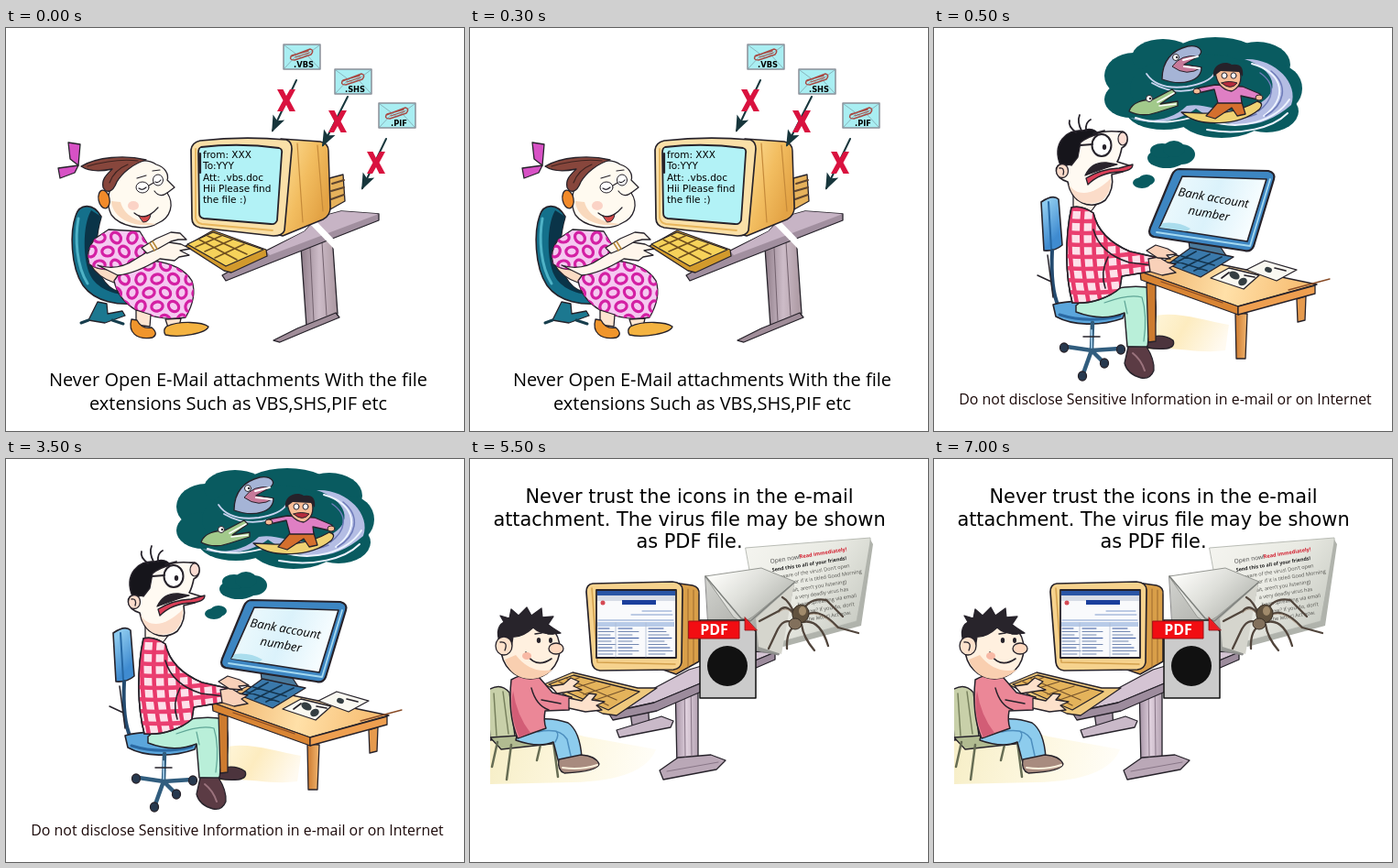
These frames come from a looping animation (500 px wide and 440 px high, 8 s). An HTML page with a canvas:

```html
<!DOCTYPE html>
<html lang="en">
<head>
<meta charset="utf-8">
<title>E-mail safety tips</title>
<style>
html, body { margin: 0; width: 100%; height: 100%; overflow: hidden; background: #fff; }
canvas { display: block; width: 500px; height: 440px; }
</style>
</head>
<body>
<canvas id="stage" width="500" height="440"></canvas>
<script>
const g = document.getElementById('stage').getContext('2d');
const INK = '#26222a';
const SANS = '"Open Sans", sans-serif';
const WIDE = '"DejaVu Sans", sans-serif';
g.lineJoin = g.lineCap = 'round';

function paint(path, fill, line, w = 1.3) {
  if (fill) { g.fillStyle = fill; g.fill(path); }
  if (line) { g.strokeStyle = line; g.lineWidth = w; g.stroke(path); }
}
const shape = (d, fill, line, w) => paint(new Path2D(d), fill, line, w);
const ink = (d, w = 1.3, color = INK) => shape(d, null, color, w);

function oval(x, y, rx, ry, fill, line, w, turn = 0) {
  const p = new Path2D();
  p.ellipse(x, y, rx, ry, turn, 0, Math.PI * 2);
  paint(p, fill, line, w);
}

function inside(d, draw) {
  g.save();
  g.clip(new Path2D(d));
  draw();
  g.restore();
}

function text(s, x, y, font, color = '#000', deg = 0, align = 'left') {
  g.save();
  g.translate(x, y);
  g.rotate(deg * Math.PI / 180);
  g.font = font;
  g.fillStyle = color;
  g.textAlign = align;
  g.fillText(s, 0, 0);
  g.restore();
}

function fade(x0, y0, x1, y1, ...colors) {
  const f = g.createLinearGradient(x0, y0, x1, y1);
  colors.forEach((c, i) => f.addColorStop(i / (colors.length - 1), c));
  return f;
}

function envelope(x, y, label) {
  g.save();
  g.translate(x, y);
  shape('M0 0H40V27H0Z', '#a9eef2', '#8b8f98', 1.5);
  ink('M1 1L20 15L39 1M1 26L14 12M39 26L26 12', 0.8, '#7fa5ae');
  ink('M8 13L29 5Q34 6 30 11L12 17Q5 17 9 12L27 7', 1.4, '#a84a44');
  ink('M13 14L28 9', 1.2, '#a84a44');
  text(label, 22, 25, `bold 8.3px ${WIDE}`, '#000', 0, 'center');
  g.restore();
}

function blockedArrow(x0, y0, x1, y1, cx, cy) {
  ink(`M${x0} ${y0}L${x1} ${y1}`, 2, '#17363c');
  g.save();
  g.translate(x1, y1);
  g.rotate(Math.atan2(y1 - y0, x1 - x0));
  shape('M2 0L-16 -7L-12 0L-16 7Z', '#17363c');
  g.restore();
  g.save();
  g.translate(cx, cy);
  shape('M-10 -12H-3.5L0 -5L4 -12H10L3.5 0L10 12H3.5L0 5L-4 12H-10L-3.5 0Z', '#d9123f');
  g.restore();
}

function woman() {
  // chair
  shape('M76 205C70 222 70 260 84 281C97 299 122 304 150 300L148 291C122 292 108 284 102 266C97 246 98 226 104 206C95 190 80 192 76 205Z', '#14708b', INK, 1.6);
  shape('M93 199C83 216 84 254 92 270C100 286 122 294 148 291C122 292 108 284 102 266C97 246 98 226 104 206Z', '#0a3448');
  ink('M79 208C75 230 77 260 89 279', 3, '#4fb3c7');
  shape('M100 299L110 301L111 312L127 309L130 314L108 322L90 319Z', '#1c7890', INK);
  ink('M90 319L82 322M116 319L128 323', 3, '#173e4d');

  // dress
  shape('M92 258Q100 272 118 278L130 280L132 260Z', '#fbdcc4', INK);
  const dress = 'M112 220L146 222L159 243L146 256L126 262Q104 267 91 258Q86 244 97 230ZM128 262L160 254Q192 258 203 276Q209 294 196 316Q170 321 142 308Q122 296 118 276Z';
  shape(dress, '#f5c9f1', INK);
  inside(dress, () => {
    for (let r = 0; r < 7; r++)
      for (let c = 0; c < 8; c++)
        oval(84 + c * 18 + (r % 2) * 9, 229 + r * 15, 5, 6.2, null, '#d420a4', 3.2, 0.5 + c);
  });

  // arms and hands
  shape('M100 259Q122 266 142 252L160 241L178 234L191 236L201 241L190 243L200 248L189 250L184 254L168 252Q142 268 122 270Z', '#fff6ec', INK);
  shape('M148 240L164 230L180 223L190 224L197 231L188 231L180 233L166 241L154 246Z', '#fff6ec', INK);
  ink('M157 235L162 243M160 233L165 241', 1.6, '#b98a3a');

  // feet
  shape('M142 308L158 313L157 326L142 324Z', '#fde5d0', INK);
  shape('M137 318C133 332 142 341 160 338Q167 334 159 327Q148 329 143 319Z', '#f0952c', INK);
  shape('M174 318L191 317L189 326L177 327Z', '#fde5d0', INK);
  shape('M175 326C190 319 214 321 221 326C219 333 190 339 174 335Q171 330 175 326Z', '#f4b341', INK);

  // head
  shape('M119 165C123 150 149 139 164 149C174 152 178 160 176 166L184 174L176 180C184 192 180 207 166 213C150 223 124 216 115 204C108 190 112 177 119 165Z', '#fffaf0', INK);
  shape('M115 189C116 208 140 219 164 214C143 212 129 205 125 190Z', '#f9d9bd');
  shape('M82 151C99 141 129 138 153 144C139 148 127 158 121 168C116 181 109 180 106 174C104 165 110 160 116 154C102 157 91 157 82 151Z', '#87463c', INK);
  ink('M89 151Q120 142 144 145M113 169Q118 155 133 149', 1.2, '#3d2320');
  shape('M68 125L81 127L79 150L70 143Z', '#d751c5', INK);
  shape('M79 150L75 158L59 164L57 153Z', '#d751c5', INK);
  oval(107, 187, 6, 10, '#f28a2a', INK, 1.3, -0.2);
  oval(149, 174, 7, 6, '#fff', INK, 1);
  oval(166, 166, 5.5, 6, '#fff', INK, 1);
  ink('M145 175Q149 178 153 174M163 168Q166 170 169 166M143 164L153 161M160 156L168 155M156 172L161 169', 1.2);
  ink('M162 178Q168 186 176 180M140 202Q152 212 166 196', 1.2);
  shape('M145 205Q152 208 158 203Q157 212 150 212Z', '#d64949', INK, 1);
  oval(139, 194, 6, 5, '#fbd3c6');
}

function attachments() {
  // desk
  shape('M322 240L356 226L362 312L328 326Z', fade(322, 0, 362, 0, '#8f7d89', '#cdbcc8', '#a9969f'), INK);
  shape('M292 341L318 328L360 311L364 316L330 330L299 343Z', '#a08d99', INK);
  ink('M332 240L336 320M345 234L350 314', 1, '#72616d');
  shape('M282 244L326 222L340 207L366 200L407 203V210L290 256L240 276L236 270Z', '#a18f9f', INK);
  shape('M284 244L326 222L340 207L366 200L407 203L288 248Z', '#c7b4c5');
  shape('M326 208L332 204L364 237L358 241Z', '#fff');

  // monitor
  shape('M353 164L368 160L370 189L354 198Z', '#e6b25c', INK);
  ink('M356 170L369 166M355 178L369 174M355 187L369 182', 2, '#5f452f');
  shape('M300 121L343 124Q352 126 352 134L354 196Q354 205 346 209L302 227L288 223Z', fade(300, 150, 356, 170, '#fbd78c', '#f2bd60', '#e3a345'), INK, 1.5);
  ink('M318 126L324 212M340 128L346 200', 1.2, '#c58a3a');
  shape('M212 123Q258 118 306 122Q312 124 312 132L304 221Q302 227 292 227L212 218Q203 216 203 208L202 133Q203 125 212 123Z', '#fae0a8', INK, 1.7);
  shape('M213 130Q255 125 298 131Q302 132 301 137L296 210Q294 215 289 214L216 208Q211 207 211 202L210 136Q210 131 213 130Z', '#b2f2f6', INK, 1.8);
  ink('M207 132L207 207Q208 213 214 214L291 221', 1.8, '#e8b65c');
  ink('M212 137V158', 2.2);
  ['from: XXX', 'To:YYY', 'Att: .vbs.doc', 'Hii Please find', 'the file :)']
    .forEach((s, i) => text(s, 215, 142 + i * 12.3, `10.5px ${WIDE}`));

  // keyboard
  shape('M196 238L226 221L284 242L285 249L246 267L238 265Z', '#d29a2c', INK);
  shape('M198 236L226 223L281 242L240 260Z', '#f6d25a', INK);
  ink('M207 239L235 227M217 244L247 231M228 251L260 236M211 231L252 253M220 227L263 247', 1.6, '#70501f');

  woman();

  envelope(303, 18, '.VBS');
  envelope(359, 45, '.SHS');
  envelope(407, 82, '.PIF');
  blockedArrow(317, 57, 291, 112, 306, 79);
  blockedArrow(373, 75, 346, 128, 362, 102);
  blockedArrow(415, 121, 389, 175, 404, 147);

  text('Never Open E-Mail attachments With the file', 253.5, 391, `500 20px ${SANS}`, '#000', 0, 'center');
  text('extensions Such as VBS,SHS,PIF etc', 253.5, 417, `500 20px ${SANS}`, '#000', 0, 'center');
}

function dream() {
  const teal = '#095b60';
  const puff = (...p) => oval(...p, teal);
  puff(218, 52, 32, 25); puff(250, 32, 34, 20); puff(307, 33, 50, 23);
  puff(353, 40, 36, 25); puff(375, 66, 27, 26); puff(363, 91, 35, 23);
  puff(314, 96, 48, 24); puff(251, 91, 41, 20); puff(215, 78, 29, 20);
  puff(290, 66, 76, 38);
  puff(254, 142, 21, 11); puff(270, 138, 15, 11); puff(249, 134, 13, 8); puff(262, 132, 12, 9);
  puff(227, 169, 10, 6); puff(232, 166, 9, 6);

  // waves
  shape('M214 98C240 108 268 101 286 88C318 111 356 114 390 84C399 60 371 32 339 34C371 44 382 70 352 84C320 100 300 80 276 85C258 102 236 103 214 98Z', '#b4bde4');
  ink('M220 98C251 108 277 99 291 95M298 100C334 114 373 101 388 78M347 39C383 49 386 78 360 96M298 111C335 118 370 109 386 93', 2, '#edf3ff');
  ink('M356 49C375 62 370 79 354 91M368 47C388 63 382 84 362 96M300 92Q328 104 352 94', 1.5, '#6f7cba');
  ink('M232 50Q244 68 276 64Q300 60 306 50M238 60Q262 74 288 66', 1.8, '#c9d4f0');

  // whale
  shape('M249 56C249 36 260 24 277 20C290 18 296 26 288 31L272 40L292 43C292 58 271 64 249 56Z', '#a5b4d6', INK);
  shape('M288 31Q270 28 260 42Q276 54 292 43L273 40Z', '#c77a9a', INK, 1);
  ink('M272 35L288 31M273 42L290 44', 2, '#fff');
  oval(264, 32, 3.5, 3.5, '#fff', INK, 1);
  oval(265, 32, 1.2, 1.2, INK);

  // crocodile
  shape('M213 91C216 81 229 78 239 78L260 67L264 71L247 83L266 80L266 85L244 92Q227 98 213 91Z', '#a2c98b', INK);
  ink('M244 81L262 71M246 85L264 83', 1.6, '#fff');
  oval(235, 77, 3.5, 3.5, '#fff', INK, 1);
  oval(236, 77, 1.2, 1.2, INK);

  // surfer
  shape('M270 92C292 92 320 99 353 80Q361 82 355 89C333 107 289 109 270 92Z', '#efd273', INK);
  shape('M311 80L335 78L340 94L331 96L325 87L307 99L297 96Z', '#d46f2e', INK);
  shape('M306 67L288 71L286 66L307 62L337 64L356 72L353 78L335 74L336 82L310 82Z', '#df7fc4', INK);
  oval(287, 69, 4, 3, '#f7bc95', INK, 1);
  oval(355, 76, 4, 3, '#f7bc95', INK, 1);
  shape('M307 47Q320 38 334 47Q338 63 325 69Q309 67 307 47Z', '#f7bc95', INK);
  shape('M305 53C303 40 317 35 325 40Q339 38 337 53L333 48L313 47Z', INK);
  oval(317, 52, 3, 3.2, '#fff', INK, 1);
  oval(327, 52, 3, 3.2, '#fff', INK, 1);
  shape('M314 60Q322 57 331 60Q324 69 314 60Z', '#b62c3d', INK, 1);
}

function plaid(d) {
  shape(d, '#fde1ea', INK, 1.5);
  inside(d, () => {
    for (let i = 0; i < 9; i++) {
      ink(`M${138 + i * 13} 184Q${130 + i * 13} 245 ${145 + i * 13} 310`, 4.5, '#e8386a');
      ink(`M136 ${196 + i * 13}Q175 ${202 + i * 13} 250 ${190 + i * 13}`, 4.5, '#ea3f70');
    }
  });
  ink(d, 1.5);
}

function disclosure() {
  dream();

  // floor tint
  shape('M222 326C243 301 286 318 322 324L318 352C284 357 250 343 222 355Z', fade(230, 310, 310, 355, '#fff8e0', '#fdecc0', '#fffaf0'));

  // chair
  shape('M117 190Q130 181 136 187L140 237Q132 244 120 243Z', fade(116, 200, 140, 220, '#8cc9ee', '#3f8bd0'), INK, 1.6);
  ink('M125 190L128 241', 2, '#2668a4');
  ink('M129 243Q127 285 136 304', 4, '#244b70');
  ink('M124 248L130 294M113 270L128 277', 1.5);
  shape('M130 302C153 295 187 299 210 306L206 317C181 326 151 325 133 315Z', '#5ba6dc', INK, 1.6);
  ink('M137 313Q169 323 203 314', 3, '#2a69a3');
  ink('M173 322L172 352M172 352L145 348M172 352L203 350M172 352L163 377M172 352L184 364', 4.5, '#315d7e');
  ink('M172 330L172 349', 2, '#91bddb');
  [[142, 349], [204, 351], [162, 380], [186, 366]].forEach(([x, y]) => oval(x, y, 4.5, 5, '#27394f', INK));
  ink('M163 337H181', 1.5);

  // legs
  shape('M155 303C175 285 215 279 238 284Q246 300 239 338L232 349L211 348L208 311Q184 321 155 310Z', '#b9efd9', INK, 1.5);
  ink('M186 300Q213 290 227 294Q233 313 229 342M211 312L208 298', 1.2, '#5fa596');
  shape('M234 338Q250 333 261 341Q264 348 254 350Q242 351 233 349Z', '#4c343d', INK);
  shape('M212 348L232 348Q241 362 240 374Q236 384 226 382Q211 378 208 366Z', '#5b3b44', INK);
  ink('M217 355Q226 362 230 374', 2, '#9b737d');

  // desk
  shape('M232 278L242 281V342L234 343Z', '#cd7b2f', INK);
  shape('M329 311L342 312L340 361H330Z', fade(328, 0, 342, 0, '#c8742a', '#f3b770'), INK);
  shape('M396 296L406 293L405 319L397 321Z', '#e59a4d', INK);
  shape('M225 266L264 248L418 280L332 304Z', fade(230, 260, 410, 300, '#edaf68', '#ffe0a8', '#f6b96c'), INK);
  shape('M225 266L332 304V313L226 275Z', '#d98534', INK);
  shape('M332 304L416 281V290L332 313Z', '#ee9f50', INK);
  ink('M387 286L432 274M248 277L315 300', 1.3, '#884b26');

  // monitor
  shape('M278 232L312 238L320 250L280 248Z', '#49799c', INK);
  shape('M268 154L365 156Q373 158 371 165L349 238Q346 245 339 243L240 228Q233 226 236 218L260 160Q263 154 268 154Z', '#3d86c2', INK, 2.2);
  shape('M271 162L363 165L342 233L246 218Z', fade(250, 180, 350, 220, '#eefafd', '#dbf2fb', '#fafeff'), INK, 1.7);
  ink('M367 165L345 238L243 223', 1.8, '#a5d9f0');
  shape('M250 213Q266 211 280 219L276 222L246 218Z', '#aadded');
  text('Bank account', 266, 183, `italic 500 13px ${SANS}`, '#000', 10);
  text('number', 277, 203, `italic 500 13px ${SANS}`, '#000', 10);

  // keyboard and papers
  shape('M255 258L280 240L327 250L291 272Z', '#3a79ab', INK);
  ink('M261 258L286 244M272 262L301 247M284 265L314 250M270 249L306 259M262 254L298 265', 1.8, '#14354f');
  shape('M302 273L322 262L355 270L338 285Z', '#f9f8f1', INK);
  shape('M341 264L361 254L396 264L374 276Z', '#f9f8f1', INK);
  oval(328, 270, 6, 4, '#343e42', null, 1, 0.5);
  oval(337, 277, 5, 4, '#343e42', null, 1, -0.5);
  oval(365, 264, 4, 3, '#343e42', null, 1, 0.3);
  ink('M314 273L322 267M339 270L350 272M372 262L384 265', 1.7);

  // neck and shirt
  shape('M152 160L152 198Q165 212 176 194L188 180Z', '#fff2e6', INK);
  plaid('M150 196C143 228 143 270 151 300C171 302 192 294 203 284L205 271L236 266L241 250L214 244C190 234 178 220 174 202Q161 193 150 196Z');
  ink('M174 220Q181 246 213 256L238 259M190 250Q181 267 187 284', 1.6);
  shape('M234 252L245 250L255 256L264 258L257 262L264 267L249 270L236 266Z', '#f9d1b9', INK);
  shape('M232 243L242 237L255 241L265 247L254 248L258 252L244 251Z', '#f9d1b9', INK);

  // head
  shape('M142 142C140 122 158 109 176 116C190 110 200 114 206 113C213 116 213 127 205 131Q203 141 200 146L216 151L206 157L194 160Q197 176 187 188C170 200 150 190 146 168C130 163 130 148 142 148Z', '#fffaf2', INK, 1.6);
  shape('M147 170C156 186 176 182 193 164Q194 179 184 188C162 199 150 184 147 170Z', '#fbdcc9');
  shape('M138 150C128 126 145 110 162 112C171 108 178 112 179 116Q167 119 160 125L157 141L150 150Q143 147 141 158Z', '#16151b', INK);
  ink('M155 114Q146 107 148 101M161 112Q156 102 159 95M166 112Q165 103 171 100', 1.8);
  oval(140, 156, 6.5, 7.5, '#fbdccb', INK);
  ink('M137 153Q143 152 141 160');
  oval(183, 128, 10.5, 12, '#fff', INK, 2);
  oval(206, 121, 5, 7, '#fbdcd2', INK, 1.2);
  oval(186, 130, 2.2, 3, INK);
  ink('M160 128L173 127M174 115L186 112', 1.8);
  shape('M165 161Q172 146 188 147L200 149L187 153Z', '#29232b', INK);
  shape('M166 164Q182 154 202 153L217 149Q217 156 202 157Q181 158 168 171Z', '#dc4058', INK);

  text('Do not disclose Sensitive Information in e-mail or on Internet', 252.5, 411, `500 15.9px ${SANS}`, '#1c0a0a', 0, 'center');
}

function letter() {
  const page = 'M301 97L437 86Q438 98 434 117L422 177L334 201L312 159Z';
  shape(page, fade(305, 95, 430, 180, '#f4f4ef', '#e9eae3', '#c7cac2'), '#b9bcb5', 1);
  shape('M422 177L437 88L440 93L427 182L342 205L334 201Z', '#b0b3ac');
  inside(page, () => {
    text('Open now!', 328, 114, `6.6px ${SANS}`, '#444', -9);
    text('Read immediately!', 360, 108.5, `bold 5.6px ${SANS}`, '#d32131', -9);
    text('Send this to all of your friends!', 330, 123, `bold 5.4px ${SANS}`, '#222', -9);
    [
      [334, 131, 'Beware of the virus! Don’t open'],
      [336, 139, 'the letter if it is titled Good Morning'],
      [346, 146, '(wait, aren’t you listening)'],
      [355, 153, 'a very deadly virus has'],
      [358, 161, 'been spreading via email'],
      [364, 169, 'know? If you do, don’t'],
      [368, 177, 'the letter! Act now.'],
    ].forEach(([x, y, s]) => text(s, x, y, `5.6px ${SANS}`, '#51514d', -9));
  });

  shape('M257 128L354 134L337 214L306 208L260 181Z', fade(260, 130, 340, 210, '#d0d1cd', '#b4b5b0', '#8f918d'), '#888', 1);
  shape('M257 128L318 119L355 134L309 172Q298 181 288 173Z', fade(270, 125, 320, 178, '#fafaf7', '#dedfda', '#babcb6'), '#969893', 1);
  ink('M257 128L296 174L306 177L354 135', 1.5, '#7e817d');
  shape('M312 174L354 136L340 213L315 205Z', '#d5d5cd');

  // spider
  const leg = '#51453c';
  ink('M357 176Q347 155 337 166L316 177M355 180Q342 171 334 190L326 207M358 181Q345 185 346 207M362 181Q364 195 376 209M363 178Q382 174 391 204M363 174Q378 158 402 184L424 190M360 172Q368 150 389 154L407 172M356 173Q349 155 341 151', 2.3, leg);
  ink('M357 176Q347 157 337 168M363 174Q378 160 401 185', 0.7, '#a58e77');
  oval(361, 169, 9, 10, '#61523f', '#393027', 1, 0.3);
  oval(355, 180, 7, 6, '#82705c', '#393027', 1);
  oval(363, 166, 4, 5, '#a18b6c');
}

function browser() {
  shape('M138 143H225V217H138Z', '#f9fafc', INK, 1.8);
  shape('M139 144H224V149H139Z', '#2a55a5');
  shape('M139 149H224V155H139Z', '#d7dce6');
  shape('M166 154H203V159H166Z', '#1b3f9c');
  oval(145, 157, 2.5, 2.5, '#d54a55');
  ink('M188 166H220M176 170H221M140 176H222', 1, '#809bcc');
  shape('M139 178H223V183H139Z', '#b8cbe8');
  for (let i = 0; i < 9; i++) {
    const y = 185 + i * 3.5;
    ink(`M140 ${y}H${152 + i * 5 % 9}M162 ${y}H${177 + i * 7 % 14}M195 ${y}H${211 + i * 3 % 11}`, 1, i % 3 ? '#7388b1' : '#3556a0');
  }
  ink('M159 179V216M192 179V216', 0.8, '#b0bdd3');
}

function icons() {
  // floor tint
  shape('M22 302Q76 287 125 303L203 317Q190 351 112 353L22 355Z', fade(30, 310, 190, 350, '#f7efc9', '#fdf7df', '#fffdf6'));

  // desk
  shape('M174 270L194 263L196 295L178 298Z', '#ae9dae', INK);
  shape('M160 296L209 281L222 286L219 293L163 304Z', '#c9b9c8', INK);
  shape('M224 244L249 232V332L226 335Z', fade(224, 0, 249, 0, '#a491a3', '#dfd0dd', '#b5a3b3'), INK);
  shape('M207 340L227 326L263 323L279 329L269 339L211 350Z', '#baa8b7', INK);
  ink('M234 241L235 325M241 238L242 324M215 341L271 331', 1, '#887687');
  shape('M151 277L239 230L307 210L333 211L201 266Z', '#d4c4d3', INK);
  shape('M151 277L201 266L333 211V219L204 275L156 285Z', '#9d8c9d', INK);

  // monitor
  shape('M222 135L243 138Q251 140 250 148V221L225 235L205 228Z', '#d99f49', INK, 1.5);
  shape('M134 136L221 134Q232 135 232 143L231 222Q230 229 222 230L142 231Q134 230 133 222L127 145Q127 137 134 136Z', '#f6d28d', INK, 1.7);
  ink('M133 141L139 222L224 224', 1.5, '#d3a14e');
  ink('M238 142V227M244 143V223', 1.2, '#a77432');
  browser();

  // keyboard
  shape('M81 246L112 233L183 250L204 250L160 280L145 278Z', '#efc97d', INK);
  shape('M86 246L113 236L185 254L151 274Z', '#e4b35b', INK);
  ink('M98 247L121 238M111 251L137 243M124 257L153 248M137 263L169 252M104 239L160 263M95 242L151 269', 1.3, '#75532c');

  // chair
  inside('M22 240H180V358H22Z', () => {
    shape('M19 253Q33 243 43 255L49 303L22 307Z', '#c8d0a9', INK);
    ink('M26 256L29 302M36 254L42 300', 1.5, '#77805d');
    shape('M22 304L83 300L98 310L34 317Z', '#b1bb91', INK);
    ink('M45 312L40 350M91 309L96 347M30 309L24 336M77 312L73 329', 2.5, '#676d54');
  });

  // legs
  shape('M54 289Q81 279 107 288Q120 297 122 326L97 332L91 309Q75 316 50 307Z', '#8dcced', INK, 1.5);
  ink('M74 298Q98 293 106 306L110 324M93 309Q98 301 94 297', 1.5, '#4d8fbf');
  shape('M97 328L121 323Q137 324 141 333Q140 341 103 343Q95 340 97 328Z', '#a88b7f', INK);
  ink('M101 337Q121 340 139 334', 2, '#faf0dc');

  // shirt and arms
  shape('M45 241Q62 231 76 239L90 255L111 260L108 274L82 275Q80 286 83 294L52 305Q41 279 45 241Z', '#eb8797', INK, 1.5);
  shape('M47 253Q51 280 66 299L54 304Q42 278 47 253Z', '#d25d76');
  ink('M67 250Q72 269 86 274M78 263L99 267', 1.4);
  shape('M108 261L122 264L130 256L138 257L133 263L147 265L138 269L144 274L126 276L108 272Z', '#fde1cb', INK);
  shape('M88 248L102 246L110 239L119 243L113 248L122 252L108 254L95 256Z', '#fde1cb', INK);

  // head
  oval(66, 207, 32, 33, '#fff0df', INK, 1.5);
  shape('M38 219C45 242 72 247 90 230Q66 235 50 214Z', '#f9cfb0');
  shape('M35 207Q25 185 37 178L33 171L43 174L45 164L53 171L62 162L67 171L78 163L79 173L91 172L85 181L99 190Q78 193 69 184Q57 195 47 194L45 207Z', '#28242b', INK);
  oval(37, 204, 9, 10, '#fde1cb', INK);
  ink('M33 200Q42 199 38 209');
  oval(75, 198, 2.2, 3, INK);
  oval(88, 198, 2, 3, INK);
  ink('M71 191L78 190M85 191L91 191', 1.5);
  oval(94, 207, 8, 6, '#fed8bf', INK);
  ink('M62 214Q73 229 89 218M61 211L64 216', 1.6);
  oval(62, 215, 5, 4, '#f8b9a5');

  letter();

  // file badge
  shape('M251 176H300L312 188V261H251Z', '#cbcbcb', '#111', 1.5);
  shape('M300 173V187H313Z', '#ef1b20', '#8e1417', 0.8);
  oval(281, 226, 22, 22, '#111');
  shape('M239 177H294V196H239Z', '#f20d12', '#9d1115', 1);
  text('PDF', 266.5, 192, `bold 16px ${SANS}`, '#fff', 0, 'center');

  ['Never trust the icons in the e-mail', 'attachment. The virus file may be shown', 'as PDF file.']
    .forEach((s, i) => text(s, 239.5, 48 + i * 24.6, `20.9px ${WIDE}`, '#000', 0, 'center'));
}

const slides = [[500, attachments], [5500, disclosure], [8000, icons]];
let shown;

function tick() {
  const t = performance.now() % 8000;
  const draw = slides.find(([end]) => t < end)[1];
  if (draw !== shown) {
    g.fillStyle = '#fff';
    g.fillRect(0, 0, 500, 440);
    draw();
    shown = draw;
  }
  requestAnimationFrame(tick);
}
tick();
</script>
</body>
</html>
```
